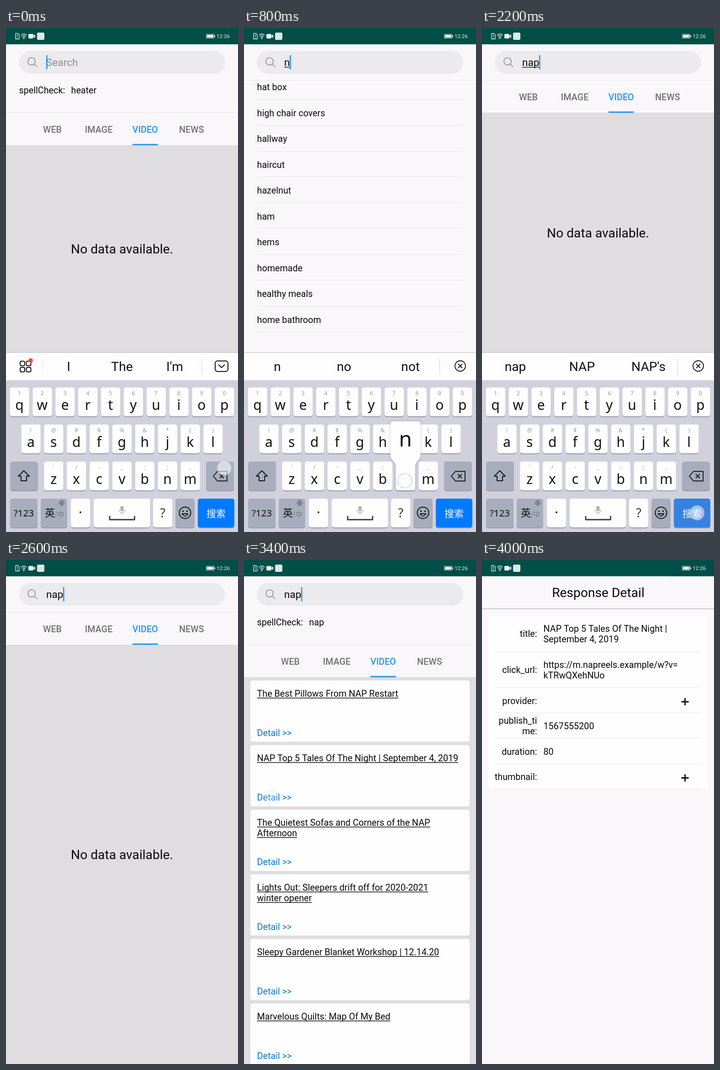
These frames come from a looping animation (508 by 1102 pixels, 4100 ms). An HTML page with a canvas:

```html
<!DOCTYPE html>
<html lang="en">
<head>
<meta charset="utf-8">
<title>Search demo</title>
<style>
html, body { margin: 0; overflow: hidden; }
canvas { display: block; width: 100vw; height: 100vh; }
</style>
</head>
<body>
<canvas id="stage" width="508" height="1102"></canvas>
<script>
const ctx = document.getElementById('stage').getContext('2d');
const W = 508, H = 1102, LOOP = 4100;
const UI = 'Roboto, sans-serif', KEYS = '"Noto Sans", sans-serif';
const CJK = '"Noto Sans CJK SC", "Noto Sans CJK", sans-serif';
const PAGE = '#f9f7fa', GRAY = '#dfdde0', LINE = '#e6e5e9', BLUE = '#2196ea';
const BODY = 19.76, INPUT = 22.58, LARGE = 28.2;

const oldList = ['hat box', 'high chair covers', 'hallway', 'haircut', 'hazelnut',
  'ham', 'hems', 'homemade', 'healthy meals', 'home bathroom'];
const newList = ['nap time', 'nap music for my bed room', 'nap', 'nap timers', 'nap cushions',
  'nap mask', 'nap playlist', 'nap sheets', 'nap 2h15', 'nay'];
const videos = [
  ['The Best Pillows From NAP Restart'],
  ['NAP Top 5 Tales Of The Night | September 4, 2019'],
  ['The Quietest Sofas and Corners of the NAP', 'Afternoon'],
  ['Lights Out: Sleepers drift off for 2020-2021', 'winter opener'],
  ['Sleepy Gardener Blanket Workshop | 12.14.20'],
  ['Marvelous Quilts: Map Of My Bed']
];

const clamp = v => Math.max(0, Math.min(1, v));

function rect(x, y, w, h, color, r = 0) {
  ctx.fillStyle = color;
  ctx.beginPath();
  ctx.roundRect(x, y, w, h, r);
  ctx.fill();
}

// Baselines sit on whole pixels; returns the width of the text.
function text(s, x, y, size = BODY, color = '#0a0a0c', align = 'left', family = UI, weight = 400) {
  ctx.font = `${weight} ${size}px ${family}`;
  ctx.fillStyle = color;
  ctx.textAlign = align;
  ctx.fillText(s, x, Math.round(y));
  return ctx.measureText(s).width;
}

function path(d, color, width = 2, x = 0, y = 0, filled = false) {
  ctx.save();
  ctx.translate(x, y);
  ctx.strokeStyle = ctx.fillStyle = color;
  ctx.lineWidth = width;
  ctx.lineJoin = 'round';
  const p = new Path2D(d);
  filled ? ctx.fill(p) : ctx.stroke(p);
  ctx.restore();
}

function circle(x, y, r, fill, stroke, width = 2) {
  ctx.beginPath();
  ctx.arc(x, y, r, 0, 7);
  if (fill) { ctx.fillStyle = fill; ctx.fill(); }
  if (stroke) { ctx.strokeStyle = stroke; ctx.lineWidth = width; ctx.stroke(); }
}

function statusBar() {
  rect(0, 0, W, 35.5, '#004e47');
  path('M21 12H26L29 15V24H21ZM25 15V19M25 20.5V22', '#e8f1f0', 1.3);
  path('M33 16Q39 10 45 16M35 19Q39 15 43 19M37 21.5Q39 19.5 41 21.5', '#e8f1f0', 1.5);
  circle(39, 23, 1.2, '#e8f1f0');
  rect(49, 13, 11, 10, '#e8f1f0', 2);
  path('M60 17L64 14V22L60 19Z', '#e8f1f0', 1, 0, 0, true);
  rect(68, 10, 16, 16, '#dbe8e5', 3);
  path('M438.5 13.5H455.5V22.5H438.5Z', '#c4d7d4', 1);
  rect(440, 15, 14, 6, '#f0f6f5');
  rect(456, 16, 2, 4, '#c4d7d4');
  text('12:26', 461, 22, 11.7, '#e8f1f0');
}

function searchBox(typed, composing) {
  rect(28, 50, 452, 50, '#ebeaec', 25);
  circle(56, 73, 8, null, '#828184', 1.5);
  path('M62 79L68 85', '#828184', 1.5);
  const width = typed ? text(typed, 88, 83, INPUT) : 0;
  if (!typed) text('Search', 88, 83, INPUT, '#8c8b8e');
  if (composing && typed) rect(88, 85, width, 1.5, '#222');
  rect(Math.round(87.6 + width), 59.5, 2.6, 31, BLUE);
}

function suggestionList(items) {
  rect(0, 114, W, 1, LINE);
  items.forEach((item, i) => {
    const y = 136 + i * 56.5;
    text(item, 28.5, y);
    rect(28, Math.round(y + 19.5), 452, 1, LINE);
  });
}

function tabs(spelling, bottom, cards) {
  const top = spelling ? 185 : 114;
  if (spelling) {
    text('spellCheck:', 28.5, 143);
    text(spelling, 142.5, 143);
  }
  rect(0, top, W, 1, LINE);
  ['WEB', 'IMAGE', 'VIDEO', 'NEWS'].forEach((name, i) =>
    text(name, 101.5 + i * 101.6, top + 43.5, BODY, i === 2 ? BLUE : '#737276', 'center', UI, 500));
  rect(0, top + 71, W, H, GRAY);
  rect(277, top + 68.5, 55.5, 3, BLUE);
  if (!cards) {
    text('No data available.', 254, (top + 71 + bottom) / 2 + 10.5, LARGE, '#0a0a0c', 'center');
    return;
  }
  videos.forEach((lines, i) => {
    const y = 263.5 + i * 141.2;
    rect(14, y, 480, 134, '#fefdff', 5);
    lines.forEach((line, k) => {
      const base = Math.round(y + 35.5 + k * 23);
      rect(28.5, base + 2, text(line, 28.5, base), 1.4, '#111');
    });
    text('Detail >>', 28.5, y + 121.5, BODY, '#0b78cb');
  });
}

function key(x, y, w, color = '#fefeff') {
  rect(x, y + 2, w, 63, '#999ba9', 5);
  rect(x, y, w, 63, color, 5);
}

function letterRow(letters, hints, x, y) {
  [...letters].forEach((c, i) => {
    const left = x + i * 49.85;
    key(left, y, 42.4);
    text(hints[i], left + 21, y + 17, 12.5, '#97979c', 'center', KEYS);
    text(c, left + 21, y + 49, 30, '#111', 'center', KEYS);
  });
}

function keyboard(words, typing, searchDown) {
  const dark = '#a7adbc', ink = '#111';
  rect(0, 709, W, 61, '#fefeff');
  rect(0, 709, W, 1, '#b9b8bc');
  rect(0, 770, W, 340, '#d1d1de');
  const centers = typing ? [73, 219, 364.5] : [137, 254, 369.5];
  words.forEach((w, i) => text(w, centers[i], 750, LARGE, ink, 'center'));
  rect(428, 723, 1, 34, '#d5d4d8');
  if (typing) {
    circle(473.5, 739, 11.5, null, ink, 1.8);
    path('M469 734.5L478 743.5M478 734.5L469 743.5', ink, 1.8);
  } else {
    rect(79, 723, 1, 34, '#ececef');
    ctx.strokeStyle = ink;
    ctx.lineWidth = 2;
    for (const x of [31, 44.5]) for (const y of [728.5, 742]) {
      ctx.beginPath();
      ctx.roundRect(x, y, 10, 10, 3);
      ctx.stroke();
    }
    circle(54, 727, 4.8, '#f04a30');
    ctx.beginPath();
    ctx.roundRect(458, 728, 28, 23, 5);
    ctx.stroke();
    path('M465 736L472 742.5L479 736', ink);
  }

  letterRow('qwertyuiop', '1234567890', 8.5, 786);
  letterRow('asdfghjkl', '!@#$%&*()', 33.4, 867);
  letterRow('zxcvbnm', "'/-_:;,", 83.2, 948);
  key(9, 948, 61, dark);
  path('M39 968L51 980H45V990H33V980H27Z', ink);
  key(438, 948, 61, dark);
  path('M454 980L463 969.5H484V990.5H463ZM468 975.5L477 984.5M477 975.5L468 984.5', ink, 1.9);

  key(9, 1029, 60, dark);
  text('?123', 39, 1068, 20.5, ink, 'center', KEYS, 500);
  key(76, 1029, 58, dark);
  text('英', 85, 1068, 22, ink, 'left', CJK, 500);
  text('/中', 106.5, 1069, 15, '#747985', 'left', CJK);
  circle(122, 1038.5, 5.5, null, '#555b66', 1);
  path('M116.5 1038.5H127.5M122 1033V1044M122 1033Q117 1038.5 122 1044Q127 1038.5 122 1033', '#555b66', .9);
  key(142, 1029, 42);
  circle(163, 1059, 2, ink);
  key(192, 1029, 123.5);
  rect(250.5, 1045, 7, 12, '#b1b1b5', 3.5);
  path('M247.5 1053Q248 1060 254 1060Q260 1060 260.5 1053M254 1060V1064', '#b1b1b5', 1.4);
  path('M227 1067V1075H281.5V1067', '#3a3a40', 2.8);
  key(322, 1029, 42);
  text('?', 343, 1070, 27, '#333', 'center', KEYS);
  key(371, 1029, 42, dark);
  circle(392, 1060, 12.5, null, ink, 2);
  circle(387.5, 1056.5, 1.7, ink);
  circle(396.5, 1056.5, 1.7, ink);
  path('M385.5 1062Q392 1072 398.5 1062Z', ink, 1.8);
  key(420, 1029, 80, searchDown ? '#3682e0' : '#007afe');
  text('搜索', 460, 1069, 21, '#fff', 'center', CJK);
}

// Enlarged key balloon above a pressed key whose row starts at y.
function balloon(c, keyX, y) {
  const x = Math.max(36, Math.min(W - 36, keyX));
  ctx.save();
  ctx.shadowColor = 'rgba(60,60,90,.3)';
  ctx.shadowBlur = 5;
  path('M-27 -88H27Q33 -88 33 -82V-15Q33 -8 28 -3Q21 4 21 12V58Q21 63 16 63H-16Q-21 63 -21 58V12' +
    'Q-21 4 -28 -3Q-33 -8 -33 -15V-82Q-33 -88 -27 -88Z', '#fefeff', 1, x, y, true);
  ctx.restore();
  text(c, x, y - 33, 46, '#111', 'center', KEYS);
}

function touch(t, x, y, from, to) {
  if (t < from || t > to) return;
  ctx.globalAlpha = clamp((to - t) / 150);
  circle(x, y, 15.5, 'rgba(250,250,255,.6)', 'rgba(190,190,205,.55)', 2);
  ctx.globalAlpha = 1;
}

function detailPage() {
  rect(0, 35.5, W, H, PAGE);
  text('Response Detail', 254.5, 81, LARGE, '#0a0a0c', 'center');
  rect(0, 106, W, 1.3, '#b2b1b5');
  rect(14, 121, 480, 380, '#fefdff', 5);
  for (const y of [200, 278, 334, 389, 445, 500]) rect(28, y, 452, 1, LINE);
  const labels = { 'title:': 168, 'click_url:': 247, 'provider:': 314.5, 'publish_ti': 358,
    'me:': 381, 'duration:': 425.5, 'thumbnail:': 481 };
  for (const name in labels) text(name, 120.5, labels[name], BODY, '#0a0a0c', 'right');
  const values = [['NAP Top 5 Tales Of The Night |', 157], ['September 4, 2019', 180],
    ['https://m.napreels.example/w?v=', 236], ['kTRwQXehNUo', 259], ['1567555200', 370], ['80', 425.5]];
  for (const [value, y] of values) text(value, 134.5, y);
  for (const y of [310, 476.5]) path('M-8 0H8M0 -8V8', '#0a0a0c', 2.8, 444.5, y);
}

function mainPage(t) {
  const typed = t < 750 ? '' : t < 1250 ? 'n' : t < 1500 ? 'na' : 'nap';
  const words = { '': ['I', 'The', "I'm"], n: ['n', 'no', 'not'],
    na: ['na', 'nap', 'and'], nap: ['nap', 'NAP', "NAP's"] }[typed];
  const hide = clamp((t - 2250) / 150);
  const results = t >= 2650;
  rect(0, 35.5, W, H, PAGE);
  searchBox(typed, t < 2300);
  if (t < 750) tabs('heater', 709, false);
  else if (t < 2150) suggestionList(t < 1500 ? oldList : newList);
  else tabs(results ? 'nap' : '', hide < 1 ? 709 : H, results);

  if (hide < 1) {
    ctx.save();
    ctx.translate(0, hide * hide * 393);
    keyboard(words, typed, t >= 2080 && t < 2250);
    if (t >= 680 && t < 900) balloon('n', 353.5, 948);
    if (t >= 1150 && t < 1300) balloon('a', 54.5, 867);
    if (t >= 1420 && t < 1560) balloon('p', 478.5, 786);
    ctx.restore();
  }
  touch(t, 478, 962, 0, 200);
  touch(t, 352, 990, 680, 1000);
  touch(t, 52, 915, 1150, 1380);
  touch(t, 476, 834, 1420, 1680);
  touch(t, 471, 1060, 2080, 2340);
  touch(t, 60, 519, 3190, 3450);
}

function draw(t) {
  const slide = 1 - (1 - clamp((t - 3505) / 495)) ** 2;
  const edge = Math.round(W * (1 - slide));
  ctx.save();
  ctx.translate(-(W - edge) * .2, 0);
  mainPage(t);
  ctx.restore();
  statusBar();
  if (slide > 0) {
    rect(0, 0, edge, H, `rgba(0,0,0,${slide * .11})`);
    ctx.save();
    ctx.beginPath();
    ctx.rect(edge, 35.5, W, H);
    ctx.clip();
    ctx.translate(Math.round(edge / 2), 0);
    detailPage();
    ctx.restore();
  }
}

function tick() {
  draw(performance.now() % LOOP);
  requestAnimationFrame(tick);
}
tick();
</script>
</body>
</html>
```
